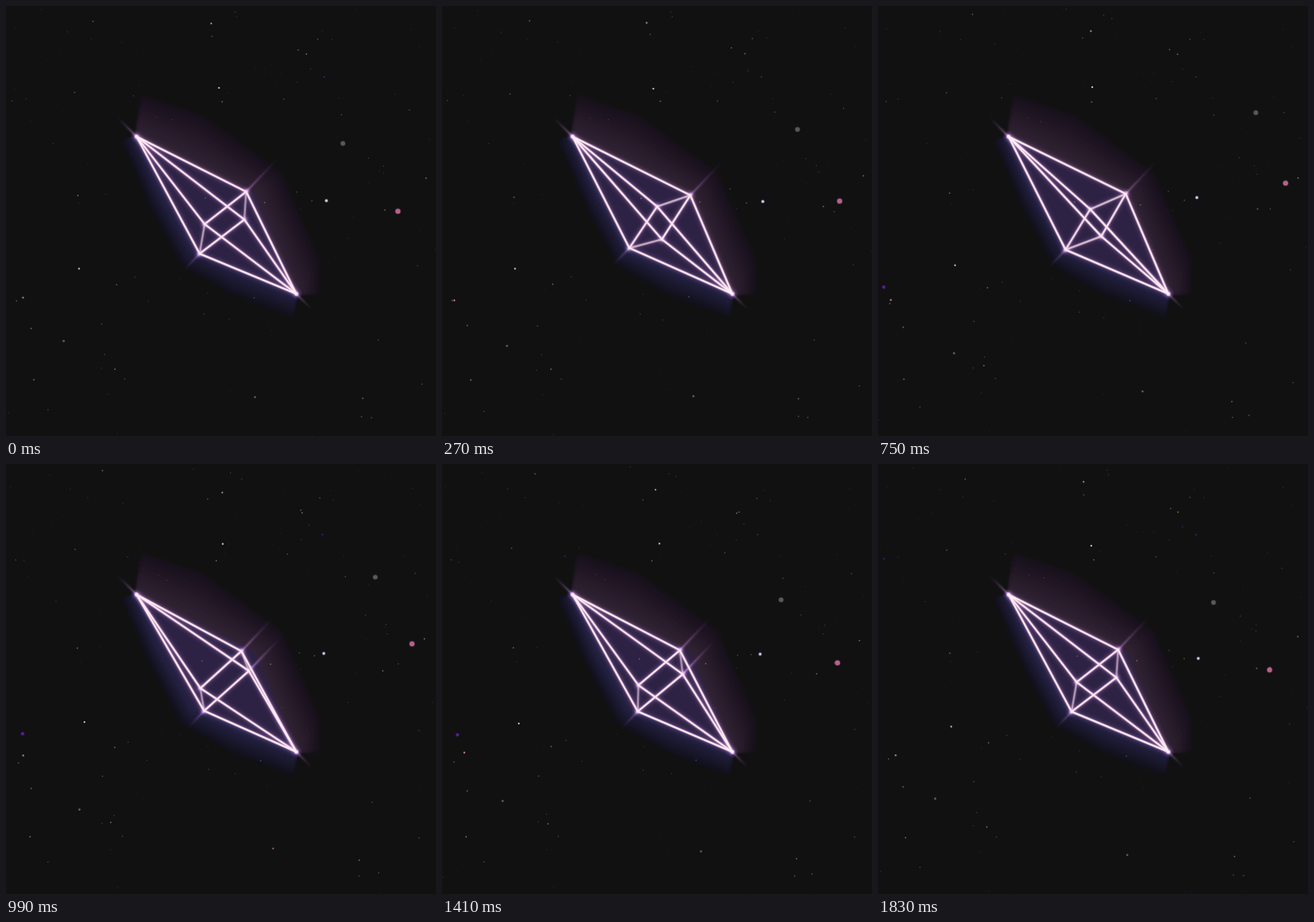
These frames come from a looping animation (520 px wide and 520 px high, 1860 ms). An HTML page with a canvas:

```html
<!DOCTYPE html>
<html lang="en">
<head>
<meta charset="utf-8">
<title>Neon crystal</title>
<style>
html, body { margin: 0; width: 100%; height: 100%; overflow: hidden; background: #111; }
canvas { display: block; width: 520px; height: 520px; }
</style>
</head>
<body>
<canvas id="stage" width="520" height="520"></canvas>
<script>
const ctx = document.getElementById('stage').getContext('2d');
const LOOP = 1860, STEP = 30, SPIN_STEPS = 31, TAU = 2 * Math.PI;
const TOP = [158, 158], BOTTOM = [351, 348], CENTER = [262.9, 261.2];

let seed = 73;
function rnd() {
  seed = (seed * 16807) % 2147483647;
  return seed / 2147483647;
}
const spread = n => (rnd() * 2 - 1) * n;

// Every star swings once per loop about (x, y), reaching (dx, dy) at phase peak
const star = (color, r, x, y, dx, dy, peak, alpha = 1) => ({ color, r, x, y, dx, dy, peak, alpha });
const stars = [
  star('#b5628b', 3, 483, 232, 10, -18, 2.7),
  star('#595959', 2.7, 429, 150, 28, -21, 2.45),
  star('#d5c5ea', 1.6, 386, 232.5, -2, -4, 3.9),
  star('#56219a', 1.8, 5, 342, 19, -20, 4),
  star('#a96b8f', 1.2, 20, 353, 7, -4, 4.8),
  star('#705549', 1.4, 80, 412, 12, 8, 2.6),
  star('#74524b', 1.3, 312, 469, 11, -4, 3.3),
  star('#c6c8d8', 1.1, 91.5, 315, 3.5, -3, 3.6),
  star('#b08979', 1.1, 254.5, 27.5, 7.5, 7.5, 3.7),
  star('#d0cadb', 1.1, 259.5, 98, 4, -2, 4.2)
];
const tints = ['#84907a', '#7a7a72', '#5a2aa0', '#8d6470', '#6b7694'];
for (let i = 0; i < 170; i++) {
  const glow = rnd() ** 3;
  stars.push(star(tints[i % tints.length], .55 + .35 * glow, rnd() * 520, rnd() * 520,
    spread(6), spread(6), 4 + spread(.6), .15 + .75 * glow));
}

function dot(x, y, r, color, alpha = 1) {
  ctx.globalAlpha = alpha;
  ctx.fillStyle = color;
  ctx.beginPath();
  ctx.arc(x, y, r, 0, TAU);
  ctx.fill();
  ctx.globalAlpha = 1;
}

function drawStars(t) {
  for (const s of stars) {
    const swing = Math.cos(t / LOOP * TAU - s.peak);
    const x = s.x + s.dx * swing, y = s.y + s.dy * swing;
    if (s.r > 1.5) dot(x, y, s.r + .8, s.color, .25);
    dot(x, y, s.r, s.color, s.alpha);
  }
}

function polygon(g, pts) {
  g.beginPath();
  pts.forEach(p => g.lineTo(p[0], p[1]));
  g.closePath();
  g.fill();
}

const mix = (a, b, k) => `rgb(${a.map((v, i) => Math.round(v + (b[i] - v) * k))})`;

// Light added around the crystal: warm bands above, blue bands below
function makeAura() {
  const c = document.createElement('canvas');
  c.width = c.height = 520;
  const g = c.getContext('2d');
  g.filter = 'blur(2px)';
  for (let k = 1; k > 0; k -= .125) {
    g.fillStyle = mix([36, 21, 38], [9, 0, 13], k);
    polygon(g, [TOP, [158 + 6 * k, 158 - 50 * k], [225 + 12 * k, 190 - 57 * k],
      [301 + 32 * k, 227 - 25 * k], [351 + 27 * k, 348 - 42 * k], [351 + 27 * k, 348], BOTTOM]);
    g.fillStyle = mix([22, 19, 56], [2, 1, 12], k);
    polygon(g, [TOP, [158 - 18 * k, 158 + 5 * k], [185 - 11 * k, 220 + 22 * k],
      [227 - 15 * k, 296 + 18 * k], [280 - 9 * k, 319 + 29 * k], [351 - 4 * k, 348 + 29 * k], BOTTOM]);
  }
  g.fillStyle = 'rgb(28,17,50)';
  polygon(g, [TOP, [300, 227], BOTTOM, [228, 295]]);
  return c;
}
const aura = makeAura();

function line(a, b, color, width, alpha) {
  ctx.globalAlpha = alpha;
  ctx.strokeStyle = color;
  ctx.lineWidth = width;
  ctx.beginPath();
  ctx.moveTo(a[0], a[1]);
  ctx.lineTo(b[0], b[1]);
  ctx.stroke();
  ctx.globalAlpha = 1;
}

function ray(p, dx, dy, alpha) {
  const q = [p[0] + dx, p[1] + dy];
  const fade = ctx.createLinearGradient(p[0], p[1], q[0], q[1]);
  fade.addColorStop(0, 'rgba(165,110,175,1)');
  fade.addColorStop(1, 'rgba(80,45,100,0)');
  line(p, q, fade, 5, alpha * .4);
  line(p, q, fade, 1.8, alpha);
}

// Corners of a tilted square turning about the long axis, with slight perspective
function corners(step) {
  return [0, 1, 2, 3].map(i => {
    const a = (-22 - 6 * step + 90 * i) * Math.PI / 180;
    const c = Math.cos(a), s = Math.sin(a), near = 1 + .06 * s;
    return [CENTER[0] + (35.1 * c + 11.7 * s) * near, CENTER[1] + (11.5 * s - 35.8 * c) * near];
  });
}

function drawCrystal(step) {
  const ring = corners(step);
  const edges = [];
  ring.forEach((p, i) => {
    const q = ring[(i + 1) % 4];
    const len = Math.hypot(p[0] - q[0], p[1] - q[1]);
    edges.push([p, q, Math.max(.45, Math.min(1, .45 + (len - 34) / 55))]);
    edges.push([TOP, p, 1], [BOTTOM, p, 1]);
  });

  ctx.globalCompositeOperation = 'lighter';
  ctx.drawImage(aura, 0, 0);
  ctx.lineCap = 'round';
  for (const [width, alpha] of [[13, .03], [9, .06], [6, .15]])
    for (const [a, b, k] of edges) line(a, b, '#8d5f9c', width, alpha * k);

  ctx.lineCap = 'butt';
  ray(TOP, -23, -23, .4);
  ray(BOTTOM, 19, 19, .35);
  for (const p of ring) {
    const side = (p[0] - CENTER[0] - p[1] + CENTER[1]) / 71;
    if (side > .42) ray(p, 38, -40, .7 - .4 * side);
    if (side < -.7) ray(p, -20, 21, .3);
  }

  ctx.globalCompositeOperation = 'source-over';
  ctx.lineCap = 'round';
  for (const [a, b, k] of edges) line(a, b, '#cf9bbd', 3.5, .65 * k);
  for (const [a, b, k] of edges) line(a, b, '#fff0f6', 2, .95 * k);
  for (const p of [TOP, BOTTOM]) dot(p[0], p[1], 1.9, '#fff4fa');
  for (const p of ring) dot(p[0], p[1], 1.2, '#fff4fa', .8);
}

function draw(now) {
  const frame = Math.floor(now % LOOP / STEP);
  ctx.fillStyle = '#111';
  ctx.fillRect(0, 0, 520, 520);
  drawStars(frame * STEP);
  drawCrystal(frame % SPIN_STEPS);
}

let start = null;
function tick(now) {
  if (start === null) start = now;
  draw(now - start);
  requestAnimationFrame(tick);
}
draw(0);
requestAnimationFrame(tick);
</script>
</body>
</html>
```
